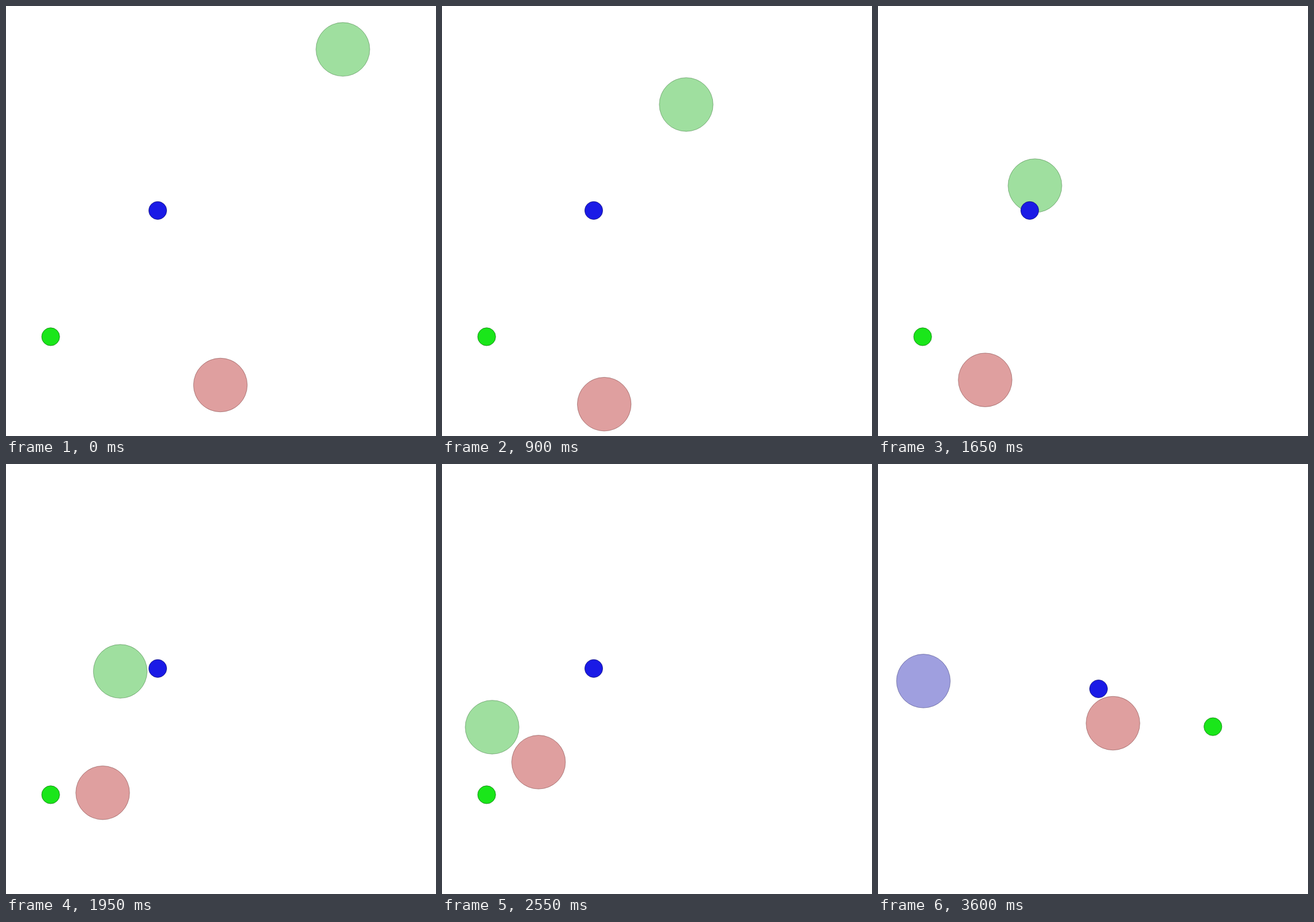
An HTML page with a canvas for the animation above (3750 ms loop, 700 by 700 pixels).

```html
<!DOCTYPE html>
<html lang="en">
<head>
<meta charset="utf-8">
<title>Particle agents</title>
<style>
  html, body { margin: 0; height: 100%; overflow: hidden; background: #fff; }
  canvas { display: block; }
</style>
</head>
<body>
<canvas id="stage" width="700" height="700"></canvas>
<script>
const ctx = document.getElementById('stage').getContext('2d');
const STEP = 150, STEPS = 25;
const AGENT_RADIUS = 43.75, LANDMARK_RADIUS = 14.6;

const RED = [191, 64, 64], GREEN = [64, 191, 64], BLUE = [64, 64, 191];
const LANDMARK_GREEN = [26, 230, 26], LANDMARK_BLUE = [26, 26, 230];

// Turning points of each agent: [step, x, y].
const redPath = smoothPath([
  [0, 349, 617], [2, 337.5, 633.5], [4, 299, 644.5], [8, 226.7, 647.8],
  [9, 204.5, 647.5], [13, 157.4, 535.2], [14, 151.5, 491.5],
  [17, 157.2, 485.3], [20, 116.3, 497.5], [21, 115.7, 502], [23, 96, 508.5]
]);
const greenPath = smoothPath([
  [0, 548.4, 70.6], [4, 453, 118.6], [8, 339.9, 210.2], [11, 255.5, 292.5],
  [13, 186, 337.5], [15, 135.5, 401.5], [17, 81.6, 428.4],
  [21, 32.3, 530.6], [23, 24, 548.5]
]);

// Cubic Hermite curve whose tangents come from the neighbouring slopes.
function smoothPath(keys) {
  const last = keys.length - 1;
  const gap = i => keys[i + 1][0] - keys[i][0];
  const slope = (i, axis) => (keys[i + 1][axis] - keys[i][axis]) / gap(i);

  function tangent(i, axis) {
    if (i === 0) return 2 * slope(0, axis) - tangent(1, axis);
    if (i === last) return 2 * slope(last - 1, axis) - tangent(last - 1, axis);
    const before = gap(i - 1), after = gap(i);
    return (slope(i - 1, axis) * after + slope(i, axis) * before) / (before + after);
  }

  return step => {
    const next = keys.findIndex(key => key[0] > step);
    const i = next < 0 ? last - 1 : next - 1;
    const u = (step - keys[i][0]) / gap(i), v = 1 - u;
    return [1, 2].map(axis =>
      keys[i][axis] * v * v * (1 + 2 * u) +
      keys[i + 1][axis] * u * u * (1 + 2 * v) +
      gap(i) * u * v * (tangent(i, axis) * v - tangent(i + 1, axis) * u));
  };
}

function disc([x, y], radius, color, fillAlpha, edgeAlpha) {
  const edge = color.map(c => c / 2);
  ctx.beginPath();
  ctx.arc(x, y, radius, 0, 2 * Math.PI);
  ctx.fillStyle = `rgba(${color}, ${fillAlpha})`;
  ctx.fill();
  ctx.strokeStyle = `rgba(${edge}, ${edgeAlpha})`;
  ctx.stroke();
}

const agent = (center, color) => disc(center, AGENT_RADIUS, color, 0.5, 0.42);
const landmark = (center, color) => disc(center, LANDMARK_RADIUS, color, 1, 0.7);

function draw(now) {
  const step = Math.floor(now / STEP) % STEPS;
  ctx.clearRect(0, 0, 700, 700);
  if (step < STEPS - 1) {
    agent(redPath(step), RED);
    agent(greenPath(step), GREEN);
    landmark([247, 332.9], LANDMARK_BLUE);
    landmark([72.7, 538.4], LANDMARK_GREEN);
  } else {
    // The last step opens a new episode.
    agent([382.5, 422], RED);
    agent([73.9, 353.3], BLUE);
    landmark([359, 366], LANDMARK_BLUE);
    landmark([545.2, 427.6], LANDMARK_GREEN);
  }
}

const start = performance.now();
function tick() {
  draw(performance.now() - start);
  requestAnimationFrame(tick);
}
tick();
</script>
</body>
</html>
```
